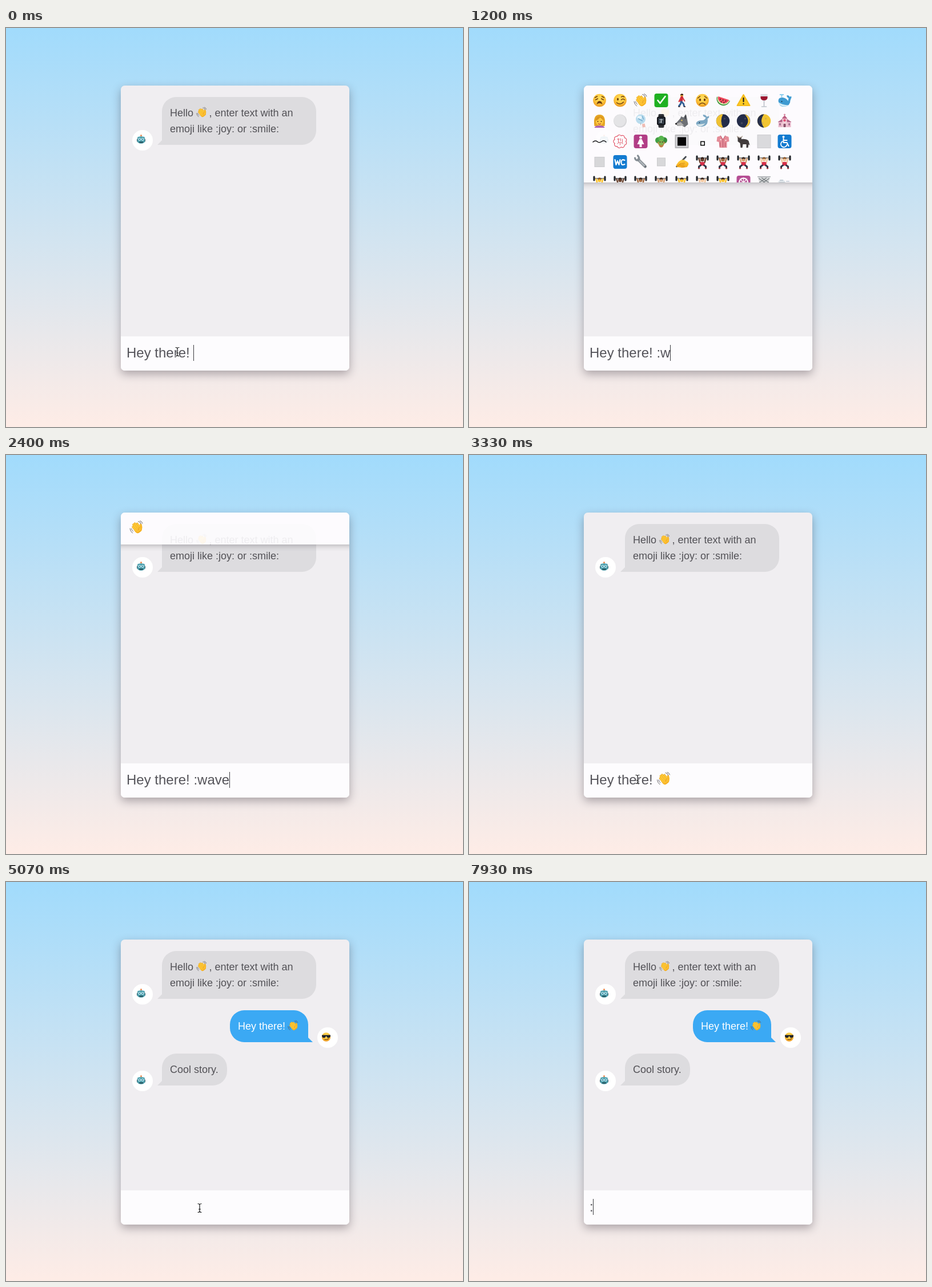
Recreate the animation shown at these times as an HTML page. Size 800 by 700 pixels, loop 8 s.

```html
<!DOCTYPE html>
<html lang="en">
<head>
<meta charset="utf-8">
<title>Emoji chat</title>
<style>
  html, body { margin: 0; width: 100%; height: 100%; overflow: hidden; }
  body { position: relative; background: linear-gradient(#a1dbfc, #feece6); }
  #shade {
    position: absolute; left: 201px; top: 101px; width: 400px; height: 500px;
    border-radius: 7px; box-shadow: 0 6px 16px rgba(50, 40, 50, .36);
  }
  svg { position: absolute; left: 0; top: 0; display: block; }
  text { font: 18px "Liberation Sans", Arial, sans-serif; fill: #525156; white-space: pre; }
  #typed { font-size: 24px; fill: #55545a; }
</style>
</head>
<body>
<div id="shade"></div>
<svg width="800" height="700" viewBox="0 0 800 700">
  <defs>
    <clipPath id="card"><rect x="201" y="101" width="400" height="500" rx="7"/></clipPath>
    <clipPath id="list"><rect id="listBox" x="201" y="101" width="400" height="170"/></clipPath>
    <radialGradient id="face" cy=".35" r=".7">
      <stop stop-color="#ffe264"/><stop offset=".6" stop-color="#fcc136"/><stop offset="1" stop-color="#e58a1c"/>
    </radialGradient>
    <linearGradient id="hand" x2="0" y2="1">
      <stop stop-color="#ffd040"/><stop offset="1" stop-color="#f5a917"/>
    </linearGradient>
  </defs>
  <g clip-path="url(#card)">
    <rect x="201" y="101" width="400" height="500" fill="#f0eef1"/>
    <g id="chat"></g>
    <g id="panel">
      <rect id="sheet" x="201" y="101" width="400" fill="#fefdff" fill-opacity=".91"/>
      <g id="fall"></g>
      <g id="icons" clip-path="url(#list)"></g>
    </g>
    <rect x="201" y="541" width="400" height="60" fill="#fdfcfe"/>
    <text id="typed" x="211" y="578"></text>
    <g id="sent"></g>
    <rect id="caret" y="556" width="1" height="28" fill="#3b3b40"/>
  </g>
  <g id="mouse" fill="none" stroke-linecap="round"></g>
</svg>
<script>
const $ = id => document.getElementById(id);

// Drawing helpers; every icon lives in a box from -12 to 12.
const disc = (x, y, r, f) => `<circle cx="${x}" cy="${y}" r="${r}" fill="${f}"/>`;
const oval = (x, y, a, b, f) => `<ellipse cx="${x}" cy="${y}" rx="${a}" ry="${b}" fill="${f}"/>`;
const box = (x, y, w, h, f, r = 0) => `<rect x="${x}" y="${y}" width="${w}" height="${h}" rx="${r}" fill="${f}"/>`;
const shape = (d, f) => `<path d="${d}" fill="${f}"/>`;
const line = (d, s, w = 1.5) =>
  `<path d="${d}" fill="none" stroke="${s}" stroke-width="${w}" stroke-linecap="round" stroke-linejoin="round"/>`;
const label = (s, x, y, f = "") => `<text x="${x}" y="${y}"${f && ` style="fill:${f}"`}>${s}</text>`;

const brown = "#6b3d12";
const face = parts => disc(0, 0, 11.3, "url(#face)") + parts;
const tile = (f, parts) => box(-12, -12, 24, 24, f, 4) + parts;
const moon = (lit, dark) => disc(0, 0, 11.7, dark ? "#232c49" : "#f2c530") + shape(lit, dark ? "#f0c232" : "#27304b")
  + disc(3, -4, 1.6, "#8885") + disc(-3, 4, 2, "#8884");
const lifter = (skin, shirt = "#d6304a", hair = "#35231c") =>
  line("M-10-7H10", "#555a60", 1.3) + line("M-9.5-10V-4M9.5-10V-4", "#25282d", 3.2) +
  line("M-4 1L-6-6M4 1L6-6", skin, 2.5) + disc(0, -4, 3.3, skin) + shape("M-3.3-4Q-3-9 0-8.5Q3-9 3.3-4L2-5.5H-2Z", hair) +
  box(-4, 0, 8, 6.5, shirt, 2) + line("M-3 6L-6 8V11M3 6L6 8V11", "#303849", 3) + line("M-7 11.3H-5M5 11.3H7", "#c53c43", 1.6);
const skins = ["#fbc22f", "#f1c7a0", "#d6a073", "#a66d43", "#69432f"];

const art = {
  wave: `<g transform="rotate(-37) translate(0 1) scale(.92)">` +
    box(-7, -3, 14, 13, "url(#hand)", 5) +
    line("M-5 3V-6M-1.6 1V-9M1.8 1V-9M5.2 3V-6", "#e39b18", 3.9) +
    line("M-5 3V-6M-1.6 1V-9M1.8 1V-9M5.2 3V-6", "#fec835", 3) +
    line("M4 7Q8 5 9.5-.5", "#f8b727", 3.6) + box(-5, 0, 10, 8, "#fcc032", 3) + line("M0 5Q2 2 5 2", "#db9119", .8) + `</g>` +
    line("M-11.5 2Q-11 7-7 10M-9 2Q-8.5 5-6 7M3-10.5Q7-10 8-6M6-11.5Q10-10 10.5-7", "#58565a", .9),
  weary: face(line("M-7-1L-3-3M7-1L3-3M-8-5L-4-7M8-5L4-7", brown, 1.4) + shape("M-5 7Q-4 1 0 1Q4 1 5 7Q0 3-5 7Z", brown)),
  wink: face(oval(-4, -2, 1.5, 2.2, brown) + line("M2-1Q5-4 8-1M-6 4Q0 9 6 3M2-6Q5-8 7-6", brown)),
  worried: face(oval(-4, -1, 1.7, 2.2, brown) + oval(4, -1, 1.7, 2.2, brown) + line("M-5 7Q0 2 5 7M-8-4L-4-7M8-4L4-7", brown)),
  cool: face(shape("M-11-5H11V-2Q9 3 5 2Q2 2 1-2H-1Q-2 2-5 2Q-9 3-11-2Z", "#20242c") + line("M-4 6Q1 8 6 4", brown, 1.7)),
  robot: line("M0-8V-11", "#a76b37", 2) + disc(0, -11, 1.8, "#e8732d") + box(-11, -3, 22, 9, "#36545f", 3) +
    shape("M-9-7Q0-10 9-7L10 4Q8 10 0 10Q-8 10-10 4Z", "#4c9fad") + disc(-4, -1, 3.5, "#dff8fa") + disc(4, -1, 3.5, "#dff8fa") +
    disc(-4, -1, 1.8, "#247e9b") + disc(4, -1, 1.8, "#247e9b") + box(-5, 5, 10, 3, "#224b53", 1),
  check: tile("#1fb122", line("M-6 0L-2 5L7-7", "#fff", 2.6)),
  walk: disc(0, -9, 2.6, "#f0b536") + shape("M-2.6-9Q-2-13 2.5-11V-9Z", "#3d2a20") + line("M0-5L-1 1", "#cf2937", 5) +
    line("M-2-4L-5 2M2-4L5 1", "#d63b46", 2) + line("M-1 2L3 6L4 10M-1 2L-2 6L-5 10", "#335f94", 3) + line("M-5.5 11H-3.5M4 11H6", "#3b2c2b", 1.6),
  melon: `<g transform="rotate(18)">` + shape("M-12-3A12 12 0 0 0 12-3Z", "#3d923e") + shape("M-11-3A11 10 0 0 0 11-3Z", "#dcf0b5") +
    shape("M-10-4A10 9 0 0 0 10-4Z", "#f0475c") + line("M-5-1V0M0-1V0M5-1V0M-2 3V4M3 3V4", "#402322") + `</g>`,
  warning: `<path d="M0-10L11 9H-11Z" fill="#fecb23" stroke="#f5bb1c" stroke-width="2" stroke-linejoin="round"/>` + line("M0-4V2M0 6V6.2", "#29251d", 2.3),
  wine: shape("M-6-11H6Q8 0 0 1Q-8 0-6-11Z", "#dce0e5") + shape("M-6-7H6Q7 0 0 0Q-7 0-6-7Z", "#9c1630") + line("M0 1V10M-4 11H4", "#bdc3ca", 1.7),
  whale: shape("M-11 1Q-11-6-3-5Q3-4 6 1L7-4Q3-6 4-9Q8-9 9-6Q12-9 12-5Q11-3 10 0Q10 10-1 11Q-10 11-11 1Z", "#3f9bd2") +
    shape("M-11 3Q-3 9 7 8Q2 12-5 10Q-10 8-11 3Z", "#d4edf7") + disc(-5, 2, 1, "#17334b") + line("M-5-6V-9Q-5-11-8-10M-5-9Q-4-11-2-10", "#72c3eb", 1.5),
  woman: shape("M-9 9Q-12-11 0-11Q12-11 9 9Z", "#e6a523") + oval(0, 0, 6.7, 8, "#fcc842") + shape("M-7 0Q-7-9 1-8Q7-8 7 0Q4-4 1-6Q-2-2-7 0Z", "#d99520") +
    disc(-3, 1, 1, brown) + disc(3, 1, 1, brown) + line("M-2 5Q0 6.5 2 5", "#bd493a") + shape("M-9 12Q-8 8 0 8Q8 8 9 12Z", "#ad65b3"),
  circle: disc(0, 0, 11.5, "#d5d5d7") + disc(-.5, -.7, 10.5, "#e4e4e6"),
  chime: disc(0, -3, 8.5, "#b9dced") + oval(-2, -6, 4, 3, "#e7f5fb") + line("M-4-4L3 0M3-8L5-3", "#79aed0") + line("M0 4V7", "#aaa", .8) + `<g transform="rotate(-12)">` + box(1, 6, 5, 6, "#efbbb2") + `</g>`,
  watch: box(-5, -12, 10, 24, "#303236", 2) + box(-7.5, -7.5, 15, 15, "#111216", 3) + box(-5.5, -5.5, 11, 11, "#303943", 1) + line("M-3-2H3M-3 2H1M0-3V3", "#d9e1e5", 1),
  wolf: shape("M-11 5L-3-4L-1-8L3-6L7-12L9-5L11 6L5 11L0 8L-7 9Z", "#6d7075") + shape("M-10 5L-2 2L4 8L-6 9Z", "#b2b1b0") + disc(-10, 5, 1.6, "#222") + disc(0, -1, 1.2, "#eccc55") + line("M7-9L6-4", "#3b3d43", 1.8),
  whale2: shape("M-11 4Q-9-1-1-1Q5-1 6-6Q1-7 1-11Q6-11 8-7Q11-10 12-7Q11-4 9-4Q11 8 0 10Q-10 11-11 4Z", "#7ba7c3") + shape("M-10 6Q0 6 5 4Q0 11-6 9Z", "#d7e5e9") + disc(-5, 3, .9, "#24384c"),
  moonA: moon("M0-11.7A11.7 11.7 0 0 0 0 11.7Q-6 0 0-11.7Z", 1),
  moonB: moon("M2-11.5A11.7 11.7 0 0 1 2 11.5Q14 0 2-11.5Z", 1),
  moonC: moon("M0-11.7A11.7 11.7 0 0 0 0 11.7Q-9 0 0-11.7Z", 0),
  church: box(-11, 1, 22, 10, "#eab9cb") + shape("M-12 2L-5-3H5L12 2Z", "#b26589") + box(-4, -4, 8, 15, "#f1d0d9") + shape("M-5-4L0-10L5-4Z", "#bd5f83") +
    line("M0-12V-9M-1.5-11H1.5", "#cf6c8b", 1) + disc(0, -1, 2.3, "#e35278") + box(-2, 5, 4, 6, "#8c526d", 1) + line("M-8 5V7M8 5V7", "#8d5678", 2),
  wavy: line("M-11.5 1Q-7-3-3 1Q0 3 4 0Q8-3 11.5 1", "#17171a", 1.5),
  flower: line(Array.from({length: 9}, (_, i) => {
    const p = k => (10 * Math.cos(k * Math.PI / 4.5)).toFixed(1) + " " + (10 * Math.sin(k * Math.PI / 4.5)).toFixed(1);
    return `M${p(i)}A3.7 3.7 0 0 1 ${p(i + 1)}`;
  }).join(""), "#e2596b", 1.2) + line("M-5-4H-1M1-5V-1M-3-5V2M4-4V2M-5 4Q0-1 5 4M0 3V6", "#e36775", 1),
  ladies: tile("#b23e86", disc(0, -7, 2.4, "#fff") + shape("M-2-4H2L6 5H2V10H-2V5H-6Z", "#fff")),
  bush: disc(-5, -2, 5.5, "#42a043") + disc(5, -2, 5.5, "#378d3b") + disc(0, -5, 5, "#57b64e") + shape("M-7 1H7L3 9Q0 12-3 9Z", "#bb8145") + disc(0, 2, 4.5, "#80b551") + disc(-2, 1, 1, "#482d22") + disc(2, 1, 1, "#482d22"),
  button: box(-12, -12, 24, 24, "#b4b4b7", 1) + box(-10, -10, 20, 20, "#d4d4d7") + box(-7.5, -7.5, 15, 15, "#050506"),
  tiny: box(-3.5, -.5, 8, 8, "#111") + box(-1.9, 1.1, 4.8, 4.8, "#fff"),
  shirt: shape("M-4-10L-10-8L-11 0L-7 1L-6 11H7L7 1L11 0L10-8L4-10L0-4Z", "#e48c98") + line("M-4-10L0-3L4-10M0-3V10M-5 2V9M4 2V9", "#b9566b", 1) + disc(-4, -3, 1, "#fff") + disc(5, -2, 1, "#fff"),
  buffalo: shape("M-10-5L-11-9L-7-6L-3-8L-4-4Q5-5 9-1L11 7L9 5L8 11H5V5L-1 5L-2 11H-5L-6 3L-10 0Z", "#423c3d") + line("M-11-9Q-6-5-2-9", "#b6a99c", 1.5),
  large: box(-12, -12, 24, 24, "#cdcdd0") + box(-11, -11, 22, 22, "#dadadd"),
  medium: box(-9, -9, 18, 18, "#cbcbce") + box(-8, -8, 16, 16, "#d7d7d9"),
  small: box(-7.5, -7.5, 15, 15, "#cacacc") + box(-6.5, -6.5, 13, 13, "#d8d8da"),
  access: tile("#137bd0", disc(-2, -8, 2, "#fff") + line("M-2-5V2H4L7 8M-2-2H4", "#fff", 2) + line("M-4 0A5.4 5.4 0 1 0 4 6", "#fff", 1.8)),
  wc: tile("#137bd0", line("M-9-4L-7 5L-4.5-2L-2 5L0-4M8-3Q2-6 2 1Q2 7 8 4", "#fff", 2.1)),
  wrench: line("M-4-4L8 8", "#777e85", 5) + line("M-4-4L8 8", "#aeb5ba", 3) + line("M-10-7Q-9-2-4-3Q-1-6-5-11", "#858d94", 3.2) + disc(8, 8, 1.2, "#50575d"),
  write: line("M-9 8L7-9", "#454a51", 2.7) + shape("M-8 3Q-4-4 3-4L10 0Q14 3 9 9L2 10L-8 9Q-11 6-8 3Z", "url(#hand)") + line("M-8 8L-2 3L5 2M-3 6L4 5M-1 9L5 8", "#d58b1b", 1.1),
  dharma: tile("#b64e94", `<circle r="7.5" fill="none" stroke="#fff" stroke-width="2"/>` + line("M-8 0H8M0-8V8M-6-6L6 6M-6 6L6-6", "#fff", 1.2)),
  basket: shape("M-10-9H10L7 11H-7Z", "#d7d9da") + line("M-11-10H11M-9-7L7 4M-4-8L8 0M9-7L-7 4M4-8L-8 0", "#777c80", 1.2),
  wind: disc(-5, 2, 7, "#e3e8ec") + line("M-8-4H-3M-9 0H0M3 1H10M3-2H8", "#a3b2bd", 1.1)
};
for (let i = 0; i < 12; i++)
  art["lift" + i] = lifter(skins[[4, 3, 2, 1, 1, 0, 4, 3, 2, 0, 1, 0][i]], "#d6304a", i > 2 && i < 6 ? "#8a5526" : "#35231c");

const icon = (name, x, y, k = 1) => `<g transform="translate(${x} ${y}) scale(${k})">${art[name]}</g>`;

const lists = {
  ":w": "weary wink wave check walk worried melon warning wine whale woman circle chime watch wolf whale2 moonA moonB moonC church " +
    "wavy flower ladies bush button tiny shirt buffalo large access medium wc wrench small write lift0 lift1 lift2 lift3 lift4 " +
    "lift5 lift6 lift7 lift8 lift9 lift10 lift11 dharma basket wind",
  ":wa": "wave walk melon warning watch moonA moonB moonC wavy buffalo basket",
  ":wav": "wave wavy",
  ":wave": "wave"
};

// Chat bubbles: a pill with one square corner and a small tail.
const bubble = (x, y, w, h, fill, own) => {
  const r = 25, flip = own ? `transform="translate(${2 * x + w} 0) scale(-1 1)"` : "";
  return `<path ${flip} fill="${fill}" d="M${x + r} ${y}h${w - 2 * r}a${r} ${r} 0 0 1 ${r} ${r}v${h - 2 * r}
    a${r} ${r} 0 0 1 ${-r} ${r}H${x - 8}l8-8V${y + r}a${r} ${r} 0 0 1 ${r} ${-r}Z"/>`;
};
const avatar = (name, x, y) => disc(x, y, 18, "#fff") + icon(name, x - 2.5, y - 1, .68);
const gray = "#dddcdf";
const messages = [
  bubble(273, 121, 270, 84, gray) + avatar("robot", 239, 197) + label("Hello", 287, 155) + icon("wave", 342.5, 148, .78) +
    label(", enter text with an", 355.5, 155) + label("emoji like :joy: or :smile:", 287, 183),
  bubble(392, 225, 137, 56, "#3ba9f4", true) + avatar("cool", 563, 273) + label("Hey there!", 406, 259, "#fff") + icon("wave", 502.5, 252, .78),
  bubble(273, 301, 114, 56, gray) + avatar("robot", 239, 349) + label("Cool story.", 287, 335)
];

// Key presses: time, plain text, shortcode, emoji placed.
const hey = "Hey there! ";
const keys = [
  [0, hey, ""], [600, hey, ":"], [915, hey, ":w"], [1330, hey, ":wa"], [1730, hey, ":wav"],
  [2130, hey, ":wave"], [2465, hey, "", true], [4395, "", ""], [7915, "", ":"]
];
const replyAt = 4930;

// Pointer: time, x, y, visible.
const track = [
  [0, 300, 568, 1], [600, 300, 568, 0], [2930, 300, 568, 1], [3320, 295, 569, 1], [4395, 295, 569, 0],
  [4930, 334, 571, 1], [5060, 339, 572, 1], [5400, 339, 572, 1], [5600, 327, 575, 1], [7915, 327, 575, 0]
];
const beam = "M-3-7.5Q0-7.5 0-5.5Q0-7.5 3-7.5M0-5.5V5.5M-3 7.5Q0 7.5 0 5.5Q0 7.5 3 7.5M-1.5 2H1.5";
$("mouse").innerHTML = line(beam, "#fff", 2.6) + line(beam, "#17171a", 1.2);
$("fall").innerHTML = Array.from({length: 13}, (_, i) =>
  `<rect x="201" y="${i}" width="400" height="1" fill="#29252b" opacity="${(.2 * (1 - i / 13) ** 2).toFixed(3)}"/>`).join("");

const last = (rows, t) => rows.findLastIndex(row => row[0] <= t);
let shown = "";

function showKey(n, replied) {
  const [, text, code, emoji] = keys[n];
  const typed = $("typed");
  typed.textContent = text + code;
  const end = 211 + (text + code ? typed.getComputedTextLength() : 0);
  $("sent").innerHTML = emoji ? icon("wave", 341, 568) : "";
  $("caret").setAttribute("x", Math.round(end - .4) + (emoji ? 28 : 0));
  $("chat").innerHTML = messages.slice(0, n < 7 ? 1 : replied ? 3 : 2).join("");

  const names = lists[code] ? lists[code].split(" ") : [];
  $("panel").style.display = names.length ? "" : "none";
  const height = Math.min(170, 20 + 36 * Math.ceil(names.length / 10));
  $("sheet").setAttribute("height", height);
  $("listBox").setAttribute("height", height);
  $("fall").setAttribute("transform", `translate(0 ${101 + height})`);
  $("icons").innerHTML = names.map((name, i) => icon(name, 228.5 + 36 * (i % 10), 127 + 36 * Math.floor(i / 10))).join("");
}

function draw() {
  const t = performance.now() % 8000;
  const n = last(keys, t), replied = t >= replyAt;
  const state = n + "," + replied;
  if (state !== shown) showKey(n, replied);
  shown = state;
  $("caret").style.display = (t - keys[n][0]) % 1000 < 500 ? "" : "none";

  const i = last(track, t), a = track[i], b = track[i + 1] || a;
  const u = b === a ? 0 : (t - a[0]) / (b[0] - a[0]);
  const k = u * u * (3 - 2 * u);
  $("mouse").style.display = a[3] ? "" : "none";
  $("mouse").setAttribute("transform", `translate(${a[1] + (b[1] - a[1]) * k} ${a[2] + (b[2] - a[2]) * k})`);
  requestAnimationFrame(draw);
}
draw();
</script>
</body>
</html>
```
